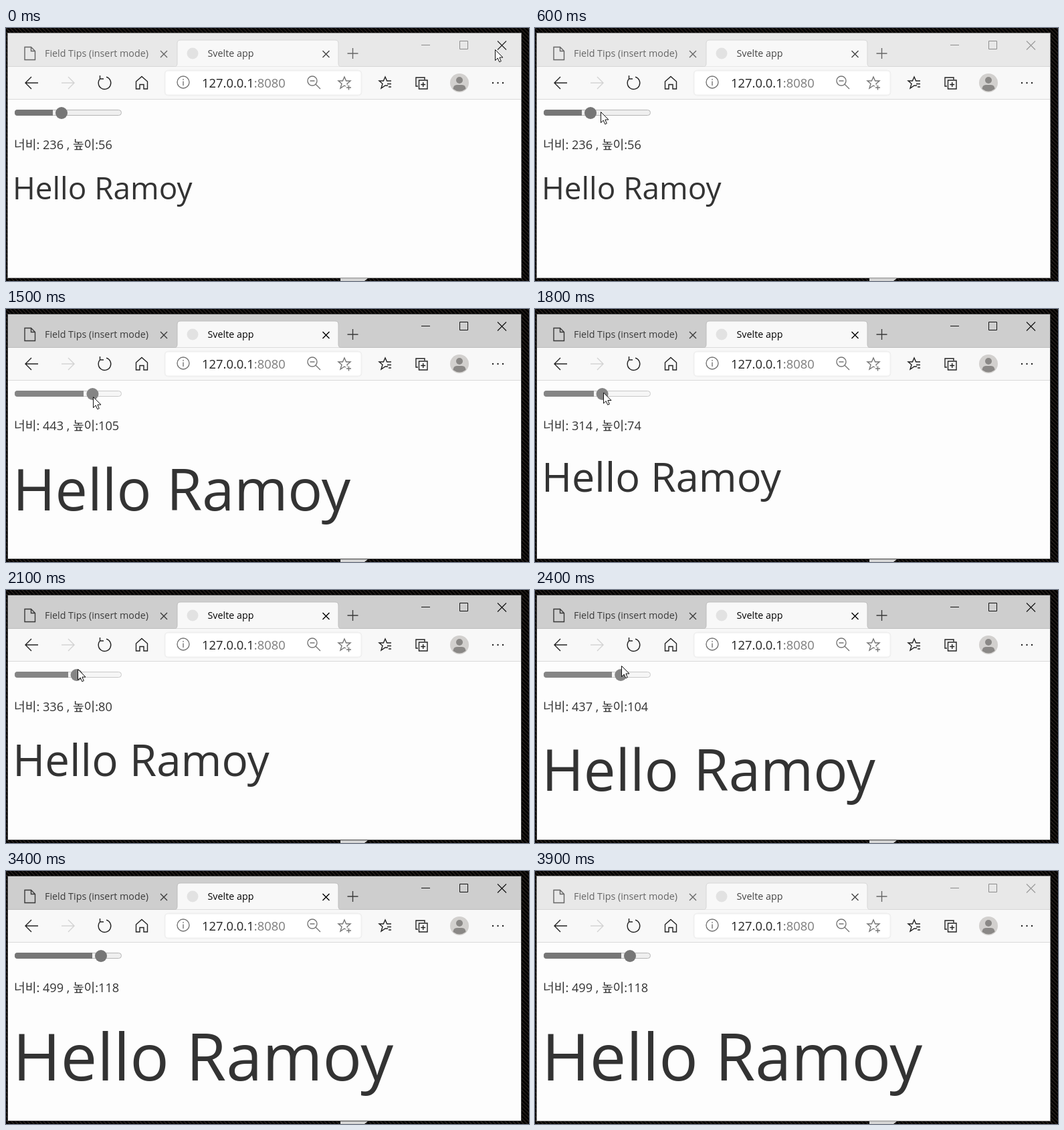
An HTML page that plays this animation: 782x378 px, repeating every 4 s.

```html
<!DOCTYPE html>
<html lang="ko">
<head>
<meta charset="utf-8">
<title>Svelte app</title>
<style>
  html, body { margin: 0; width: 100%; height: 100%; overflow: hidden; background: #000; }
  svg { display: block; width: 782px; height: 378px; }
  text { font-family: "Open Sans", "Noto Sans CJK KR", "Noto Sans CJK JP", "Noto Sans CJK", sans-serif; white-space: pre; }
  .line { fill: none; stroke: #222; stroke-width: 1.4; }
  .soft { stroke: #767676; }
  .tab { font-size: 14.3px; }
  svg { --frame: #3c3c3c; --strip: #cecece; --shade: #bdbdbd; --label: #3a3a3a; --title: #000; --control: #111; --close: #111; }
  svg.inactive { --frame: #8a8a8a; --strip: #e8e8e8; --shade: #d6d6d6; --label: #666; --title: #444; --control: #8c8c8c; --close: #9a9a9a; }
  svg.overClose { --close: #222; }
  svg { --fill: #767676; --thumb: #767676; --rest: #efefef; --edge: #b5b5b5; }
  svg.hover { --thumb: #666; }
  svg.drag { --fill: #858585; --thumb: #858585; --rest: #f6f6f6; --edge: #c9c9c9; }
</style>
</head>
<body>
<svg id="stage" viewBox="0 0 782 378">
  <defs>
    <pattern id="weave" width="6" height="6" patternUnits="userSpaceOnUse">
      <rect width="6" height="6" fill="#030202"/>
      <path d="M-1 -1L7 7M-1 5L1 7M5 -1L7 1" stroke="#29231f" stroke-width="1.3"/>
    </pattern>
    <path id="cross" d="M-5 -5L5 5M5 -5L-5 5"/>
    <path id="star" d="M0 -9L2.6 -3H9L4 1.3L6 8L0 4L-6 8L-4 1.3L-9 -3H-2.6Z"/>
  </defs>

  <rect width="782" height="378" fill="url(#weave)"/>
  <path d="M500 378v-4h41l-5 4z" fill="#d4d4d4"/>

  <rect x="2.5" y="7.5" width="768" height="366" fill="#fdfdfd" style="stroke:var(--frame)"/>
  <rect x="3" y="8" width="767" height="50" style="fill:var(--strip)"/>
  <path d="M3 57.5H770" style="stroke:var(--shade)"/>
  <path d="M251 58q5 0 5 -5V23q0 -5 5 -5H492q5 0 5 5V53q0 5 5 5z" fill="#f8f8f8" style="stroke:var(--shade)"/>
  <rect x="3" y="58" width="767" height="48" fill="#f8f8f8"/>
  <path d="M3 106.5H770" stroke="#dadada"/>
  <rect x="237.5" y="63.5" width="294" height="37" rx="5" fill="#fff" stroke="#f0f0f0" stroke-width="2"/>

  <!-- tabs and window controls -->
  <g class="line" style="stroke:var(--label)">
    <path d="M28 28.5h9.5l6 6v13H28zM37.5 28.5v6h6"/>
    <use href="#cross" x="236" y="39"/>
    <path d="M510.5 38H526.5M518.5 30V46"/>
  </g>
  <use href="#cross" x="478.5" y="39" class="line" style="stroke:var(--title)"/>
  <circle cx="279" cy="38" r="8.5" fill="#e2e2e2"/>
  <text class="tab" x="58" y="43" style="fill:var(--label)">Field Tips (insert mode)</text>
  <text class="tab" x="301.5" y="43" style="fill:var(--title)">Svelte app</text>
  <path class="line" style="stroke:var(--control);stroke-width:1" d="M621 25.5H634M678.5 19.5h12v12h-12z"/>
  <path class="line" style="stroke:var(--close);stroke-width:1.1" d="M735 19.5L748 32.5M748 19.5L735 32.5"/>

  <!-- toolbar -->
  <g class="line">
    <path d="M48 82H29M38 73L29 82L38 91"/>
    <path d="M83 82H102M93 73L102 82L93 91" stroke="#d3d3d3"/>
    <path d="M141 75.5A9.3 9.3 0 1 0 150 73.2M140.5 71V76H146"/>
    <path d="M194.5 80L203 72.5L211.5 80V91H206V84.5H200V91H194.5Z"/>
    <path d="M571 86L567 86L561 90L563 83.3L558 79H564.4L567 73L569.6 79H576M570 83.5H576M572 88H576"/>
    <path d="M616 87H613V74H626V77M617.5 78H630V91H617.5ZM623.7 81V88M620.2 84.5H627.2"/>
  </g>
  <g class="line soft">
    <circle cx="265" cy="81" r="9"/>
    <path d="M265 79.5V86M265 76V77.7"/>
    <circle cx="458" cy="79" r="7"/>
    <path d="M463 84L470 91M454.5 79H461.5"/>
    <use href="#star" x="506" y="82"/>
    <path d="M512.5 84V94M507.500 89H517.500" stroke="#fff" stroke-width="4"/>
    <path d="M512.5 85.500V92.500M509 89H516"/>
  </g>
  <text x="293" y="89" font-size="18.4" fill="#222">127.0.0.1<tspan fill="#7b7b7b">:8080</tspan></text>
  <circle cx="678" cy="82" r="14" fill="#d2d0ce"/>
  <circle cx="678" cy="78" r="5" fill="#8a8886"/>
  <path d="M668.5 91Q669 85 674 85H682Q687 85 687.5 91Q678 98 668.5 91" fill="#8a8886"/>
  <g fill="#222"><circle cx="728" cy="82" r="1.2"/><circle cx="735.5" cy="82" r="1.2"/><circle cx="743" cy="82" r="1.2"/></g>

  <!-- page -->
  <rect x="13.5" y="122.5" width="159" height="8" rx="4" style="fill:var(--rest);stroke:var(--edge)"/>
  <rect id="fill" x="13" y="122" height="9" style="fill:var(--fill)" clip-path="inset(0 0 0 0 round 4px 0 0 4px)"/>
  <circle id="thumb" cy="127" r="9" style="fill:var(--thumb)"/>
  <text id="info" x="12" y="181" font-size="18.15" fill="#333"></text>
  <text id="hello" x="10" fill="#333">Hello Ramoy</text>

  <path id="cursor" d="M.5 .5V16.5L4.2 13L6.7 18.7L9.3 17.6L6.9 12H12Z" fill="#fff" stroke="#111"/>
</svg>

<script>
  const LOOP = 4000, TICK = 100;
  const PRESS = 10, RELEASE = 28, GONE = 32, BLUR = 39;
  const $ = id => document.getElementById(id);
  const stage = $('stage');

  // [tick, font size]
  const sizeKeys = [[0, 42], [9, 42], [10, 46], [15, 79], [16, 80], [17, 74],
    [19, 37], [21, 60], [24, 78], [27, 88], [28, 89]];
  // [tick, x, y]; while dragging, x follows the thumb
  const pointerKeys = [[0, 731, 32], [1, 650, 62], [2, 445, 108], [3, 218, 108],
    [4, 150, 130], [5, 112, 127], [6, 98, 125], [7, 92, 121], [8, 88, 123],
    [10, 88, 123], [15, 131, 131], [21, 108, 118], [24, 129, 113],
    [28, 143, 115], [29, 190, 128], [31, 735, 120]];

  function sample(keys, tick, column) {
    const next = keys.findIndex(key => key[0] >= tick);
    if (next < 0) return keys[keys.length - 1][column];
    if (next === 0) return keys[0][column];
    const a = keys[next - 1], b = keys[next];
    return a[column] + (b[column] - a[column]) * (tick - a[0]) / (b[0] - a[0]);
  }

  function draw(tick) {
    const size = Math.round(sample(sizeKeys, tick, 1));
    const thumbX = 83 + 1.255 * (size - 42);
    const dragging = tick >= PRESS && tick < RELEASE;

    stage.classList.toggle('inactive', tick < PRESS || tick >= BLUR);
    stage.classList.toggle('overClose', tick === 0);
    stage.classList.toggle('drag', dragging);
    stage.classList.toggle('hover', (tick > 6 && tick < PRESS) || tick === RELEASE);

    $('fill').setAttribute('width', Math.round(thumbX - 26));
    $('thumb').setAttribute('cx', thumbX);
    $('info').textContent = `너비: ${Math.round(size * 5.608)} , 높이:${Math.round(size * 1.33)}`;

    const px = size * 1.125;
    $('hello').setAttribute('font-size', px * 0.97);
    $('hello').setAttribute('y', 205.5 + 1.075 * px);

    const x = dragging ? Math.round(thumbX + 1) : sample(pointerKeys, tick, 1);
    $('cursor').setAttribute('transform', `translate(${x} ${sample(pointerKeys, tick, 2)})`);
    $('cursor').setAttribute('visibility', tick < GONE ? 'visible' : 'hidden');
  }

  const start = performance.now();
  function frame() {
    draw(Math.floor((performance.now() - start) % LOOP / TICK));
    requestAnimationFrame(frame);
  }
  frame();
</script>
</body>
</html>
```
